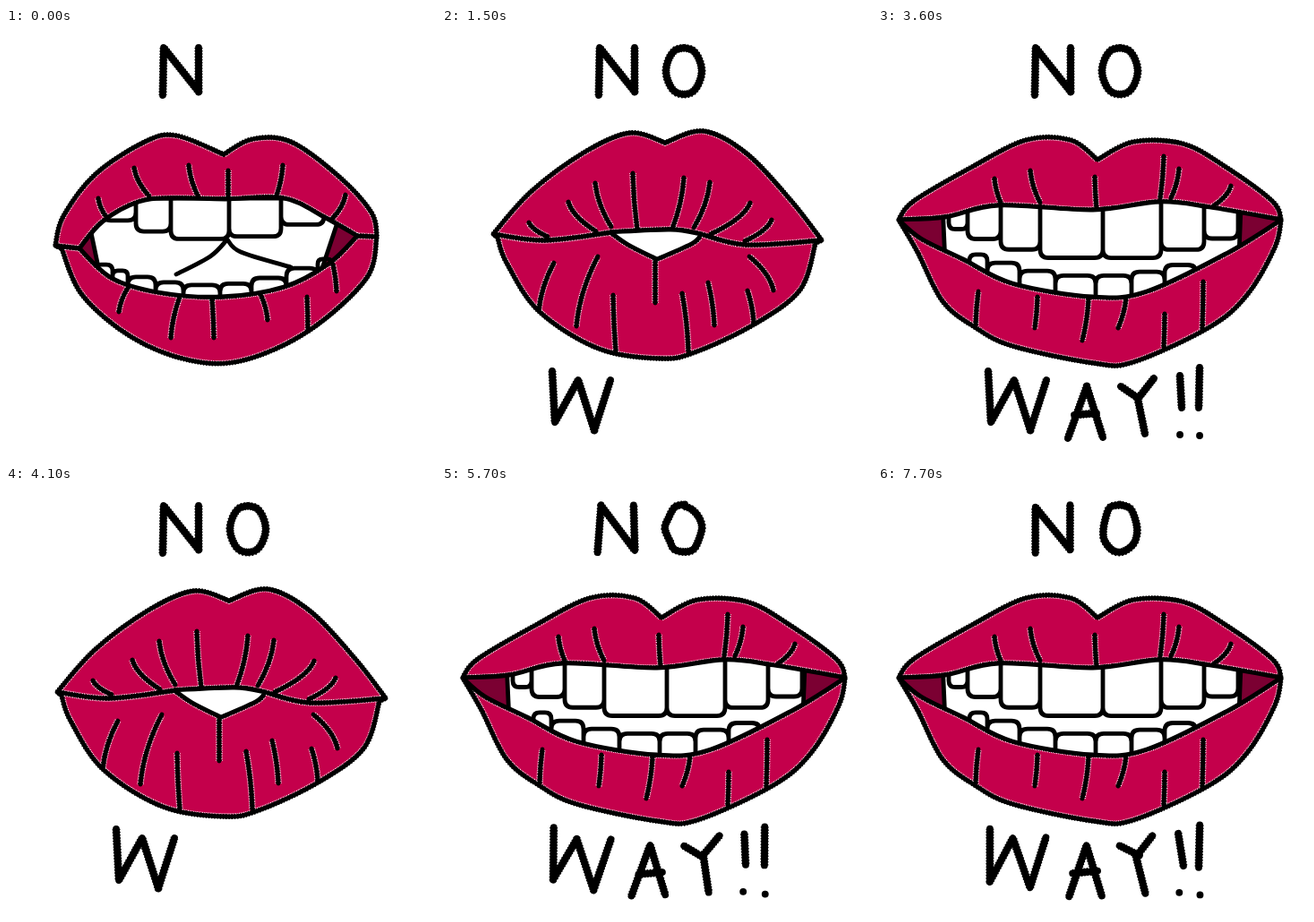
Animation, 480 px wide and 480 px high, one loop 7800 ms. Source, as an HTML page:

```html
<!DOCTYPE html>
<html lang="en">
<head>
<meta charset="utf-8">
<title>No way</title>
<style>
  html, body { margin: 0; width: 100%; height: 100%; overflow: hidden; background: #fff; }
  svg { display: block; width: 100vw; height: 100vh; }
  path { stroke-linecap: round; stroke-linejoin: round; }
  .halo, .ink, .fuzz { fill: none; }
  .halo { stroke: #fff; stroke-width: 7.4; stroke-dasharray: 1 1; stroke-linecap: butt; }
  .ink { stroke: #000; stroke-width: 4.8; }
  .fuzz { stroke: #000; stroke-width: 5.8; stroke-dasharray: 1.4 1.8; stroke-linecap: butt; }
  .letter .ink { stroke-width: 7.8; }
  .letter .fuzz { stroke-width: 9; }
</style>
</head>
<body>
<svg id="stage" viewBox="0 0 480 480" role="img" aria-label="NO WAY!!"></svg>
<script>
const RED = '#c4004b', DARK = '#7b0032', WHITE = '#fff';
const FRAME = 100, WOBBLE = 2;

function ring(cx, cy, rx, ry) {
  const pts = [];
  for (let i = 0; i <= 12; i++) {
    const a = i * Math.PI / 6;
    pts.push(`${Math.round(cx + rx * Math.sin(a))},${Math.round(cy - ry * Math.cos(a))}`);
  }
  return pts.join(' ');
}

// Shapes are key points joined by a smooth curve; "/" marks a corner, ";" a new stroke.
// A crease is a free end and a root. Teeth are edges along a parabola of tips.
const normal = {
  lip: '55,243 64,210 100,163 155,127 190,120 243,141 / 275,124 318,127 372,166 408,206 414,233 / 402,280 338,338 265,371 205,371 140,345 85,298 62,246 / 55,243',
  mouth: '82,246 108,216 148,194 185,190 245,191 310,190 355,211 392,232 / 360,263 310,289 240,300 170,295 118,279 82,246',
  seam: '55,243 82,246; 392,232 414,233',
  gap: 'M87,190 L379,190 339,310 112,310Z',
  tongue: '247,236 228,255 190,275; 247,236 262,250 318,267',
  upper: { edges: [108, 145, 184, 249, 307, 355], mid: 235, tip: 236, curve: 18 },
  lower: { edges: [99, 119, 136, 167, 198, 239, 274, 313, 348, 364], mid: 225, tip: 287, curve: 17 },
  creases: '143,156 160,188; 204,153 215,189; 248,159 248,190; 309,153 302,187; 379,186 364,213; 103,190 112,211; 126,317 138,287; 184,346 194,300; 232,346 230,302; 292,326 284,297; 337,338 336,300; 369,294 365,264'
};
const pout = {
  lip: '57,230 100,182 160,138 210,117 249,128 / 292,115 340,140 390,193 424,237 / 417,240 / 400,292 350,330 285,361 245,369 175,358 108,316 72,262 62,234 / 57,230',
  mouth: '188,228 255,225 289,230 / 280,240 240,258 / 208,242 188,228',
  seam: '57,230 115,237 190,228; 289,230 340,242 424,237',
  creases: '97,217 118,233; 141,194 172,227; 171,173 189,222; 213,162 218,225; 270,167 257,224; 299,172 281,223; 344,195 300,230; 368,214 338,238; 238,307 238,258; 108,316 125,262; 150,333 174,255; 191,298 194,361; 275,361 268,296; 304,332 297,284; 348,329 341,293; 370,293 343,255'
};
const smile = {
  lip: '23,214 40,193 105,155 165,125 215,125 245,147 / 285,127 340,129 385,153 440,193 450,214 / 443,245 412,298 370,334 285,373 240,374 150,355 108,334 72,305 44,250 23,214',
  mouth: '23,214 75,211 135,198 240,203 315,194 370,200 450,214 / 390,251 300,294 240,300 150,285 95,258 48,235 23,214',
  gap: 'M70,150 L407,150 400,330 78,330Z',
  upper: { edges: [79, 100, 137, 181, 251, 316, 364, 402], mid: 250, tip: 258, curve: 13 },
  lower: { edges: [102, 122, 158, 198, 243, 283, 320, 355], mid: 243, tip: 277, curve: 14 },
  creases: '130,168 138,197; 170,159 181,195; 242,166 244,202; 319,143 315,190; 336,157 327,190; 394,176 374,199; 109,332 112,294; 178,300 175,335; 235,302 228,349; 277,300 268,335; 320,319 319,357; 363,283 362,337'
};
const MOUTHS = {
  n: normal,
  o: { ...pout, mouth: ring(240, 237, 62, 34), upper: { edges: [182, 208, 240, 272, 298], mid: 240, tip: 240, curve: 20 } },
  w: pout,
  a: { ...normal, place: 'translate(240 245) scale(1.06 1.03) translate(-240 -245)' },
  y: smile
};

const LETTERS = [
  '175,75 176,22 / 215,71 / 215,22',
  ring(270, 48, 20, 26),
  '123,383 126,440 / 152,393 / 170,449 / 188,393',
  '212,458 233,400 / 251,457; 219,432 244,430',
  '271,400 290,413; 308,391 290,414 / 298,453',
  '337,388 339,424; 337,454; 359,379 358,424; 359,455'
];

// [mouth, take, letters shown], one entry per step
const STEPS = [['n', 0, 1], ['o', 0, 2], ['w', 0, 3], ['a', 0, 4]];
for (let i = 0; i < 9; i++) STEPS.push(['y', i % 3, 6]);

const stage = document.getElementById('stage');

function add(parent, tag, attrs = {}) {
  const el = document.createElementNS('http://www.w3.org/2000/svg', tag);
  for (const key in attrs) el.setAttribute(key, attrs[key]);
  return parent.appendChild(el);
}

const points = text => text.trim().split(/\s+/).map(p => p.split(',').map(Number));

function smooth(pts) {
  let d = '';
  for (let i = 0; i < pts.length - 1; i++) {
    const p = pts[i], q = pts[i + 1];
    const before = pts[i - 1] || p, after = pts[i + 2] || q;
    const c1 = p.map((v, k) => v + (q[k] - before[k]) / 6);
    const c2 = q.map((v, k) => v - (after[k] - p[k]) / 6);
    d += `C${c1} ${c2} ${q}`;
  }
  return d || 'h.1';
}

function trace(text = '') {
  return text.split(';').filter(Boolean).map(stroke => {
    let last = null, d = '';
    for (const run of stroke.split('/')) {
      const pts = points(run);
      if (last) pts.unshift(last);
      else d = `M${pts[0]}`;
      d += smooth(pts);
      last = pts[pts.length - 1];
    }
    return d;
  }).join('');
}

// Leaves the free end upright, then bends towards the root.
function crease(text) {
  const [[x, y], [rx, ry]] = points(text);
  return `M${x},${y}Q${x + (rx - x) * 0.15},${(y + ry) / 2} ${rx},${ry}`;
}

// Rounded teeth hanging (side -1) or standing (side 1); the mouth clips their roots.
function teeth(row, side) {
  if (!row) return '';
  const { edges, mid, tip, curve } = row;
  return edges.slice(1).map((b, i) => {
    const a = edges[i], m = (a + b) / 2;
    const y = tip - curve * ((m - mid) / 100) ** 2;
    const r = Math.min(9, (b - a) * 0.35), bend = y + side * r;
    return `M${a},${y + side * 80}V${bend}Q${a},${y} ${a + r},${y}H${b - r}Q${b},${y} ${b},${bend}V${y + side * 80}`;
  }).join('');
}

function drawMouth(key, m) {
  const g = add(stage, 'g', { transform: m.place || '' });
  const lip = trace(m.lip), mouth = trace(m.mouth);
  const lines = lip + mouth + trace(m.seam) + m.creases.split(';').map(crease).join('');
  add(g, 'path', { d: lip, fill: RED });
  for (const cls of ['halo', 'fuzz', 'ink']) add(g, 'path', { d: lines, class: cls });

  const clip = add(g, 'clipPath', { id: `clip-${key}` });
  add(clip, 'path', { d: mouth });
  const inside = add(g, 'g', { 'clip-path': `url(#clip-${key})` });
  const gap = m.gap || 'M0,0H480V480H0Z';
  add(inside, 'path', { d: mouth, fill: DARK });
  add(inside, 'path', { d: gap, fill: WHITE });
  add(inside, 'path', { d: gap + teeth(m.upper, -1) + teeth(m.lower, 1) + trace(m.tongue), class: 'ink' });
  add(g, 'path', { d: mouth, class: 'ink' });
  return g;
}

function noise(seed) {
  const v = Math.sin(seed * 12.9898) * 43758.5453;
  return (v - Math.floor(v)) * 2 - 1;
}

function drawLetter(text, index, take) {
  let seed = index * 40 + take * 300;
  const amount = take ? WOBBLE : 0;
  const d = trace(text.replace(/\d+/g, n => +n + amount * noise(seed++)));
  const g = add(stage, 'g', { class: 'letter' });
  for (const cls of ['fuzz', 'ink']) add(g, 'path', { d, class: cls });
  return g;
}

const mouths = Object.fromEntries(Object.entries(MOUTHS).map(([k, m]) => [k, drawMouth(k, m)]));
const takes = [0, 1, 2].map(take => LETTERS.map((text, i) => drawLetter(text, i, take)));
const show = (el, on) => { el.style.display = on ? '' : 'none'; };

function render(time) {
  const [mouth, take, count] = STEPS[Math.floor(time / FRAME) % STEPS.length];
  for (const key in mouths) show(mouths[key], key === mouth);
  takes.forEach((letters, t) => letters.forEach((el, i) => show(el, t === take && i < count)));
}

const start = performance.now();
function tick() {
  render(performance.now() - start);
  requestAnimationFrame(tick);
}
tick();
</script>
</body>
</html>
```
